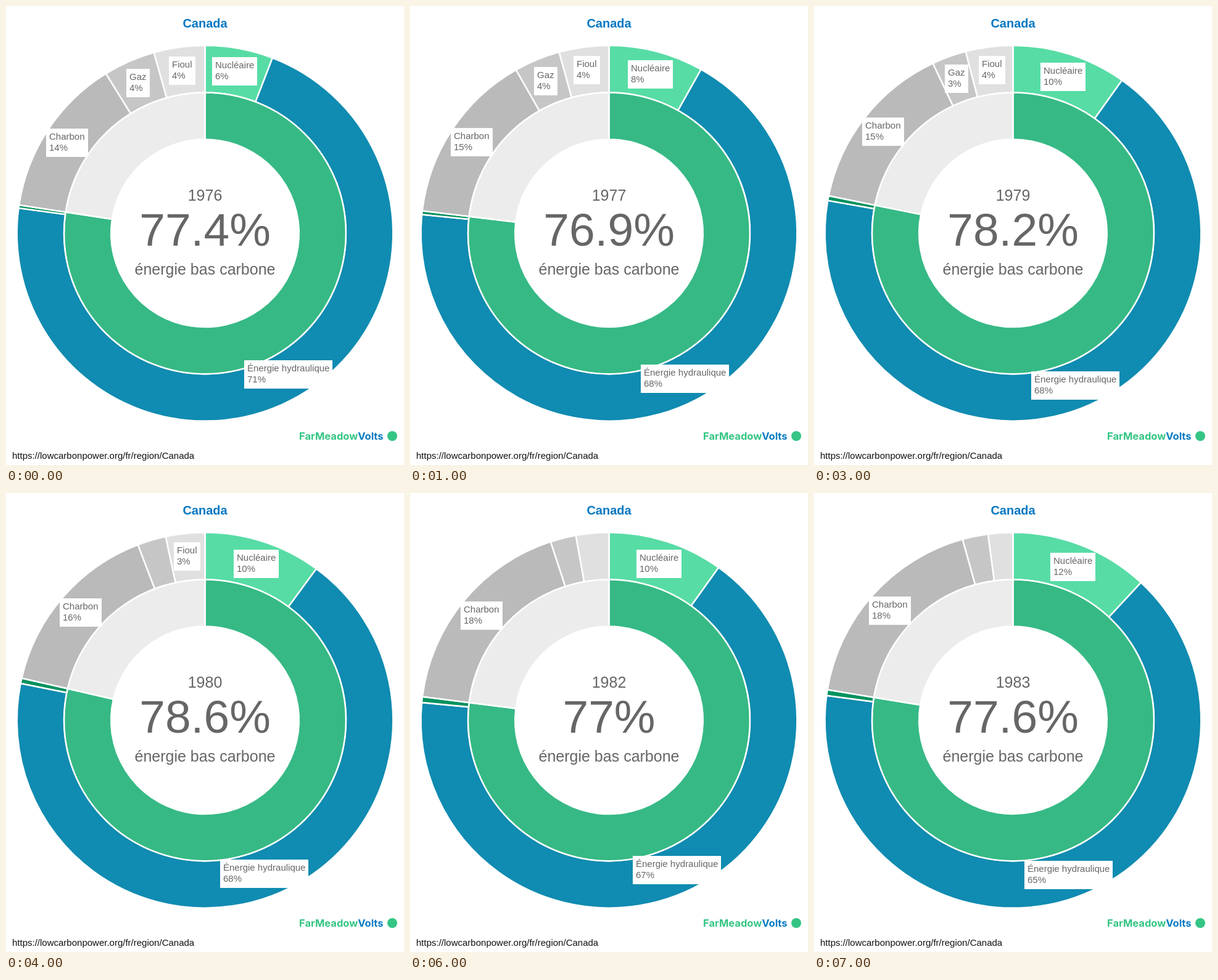
Animation, 645 px wide and 745 px high, one loop 8000 ms. Source, as an HTML page with a canvas:

```html
<!DOCTYPE html>
<html lang="fr">
<head>
<meta charset="utf-8">
<title>Canada</title>
<style>
  html, body { margin: 0; width: 100%; height: 100%; overflow: hidden; background: #fff; }
  canvas { display: block; }
</style>
</head>
<body>
<canvas id="chart" width="645" height="745"></canvas>
<script>
const ctx = document.getElementById('chart').getContext('2d');
const CX = 322.5, CY = 368.8;
const RADII = { hole: 152.3, middle: 228.4, outer: 304.8, label: 266.8 };
const YEAR_MS = 1000, YEAR_COUNT = 8, FIRST_YEAR = 1976, MIN_LABEL = 2.9;
const SANS = '"Liberation Sans", Arial, sans-serif';

// Shares in percent at a few key years; the years between are interpolated.
const KEY_YEARS = [0, 1, 3, 5, 6, 7];
const LOW_CARBON = [77.4, 76.9, 78.2, 78.9, 77, 77.6];
const NUCLEAR = [5.84, 8.14, 9.84, 10.32, 9.9, 11.91];
const OIL = [4.38, 4.27, 4.05, 2.66, 2.82, 2.12];

function shareAt(year, shares) {
  const i = Math.max(1, KEY_YEARS.findIndex(key => key >= year));
  const t = (year - KEY_YEARS[i - 1]) / (KEY_YEARS[i] - KEY_YEARS[i - 1]);
  return shares[i - 1] + (shares[i] - shares[i - 1]) * t;
}

function energyMix(year) {
  const lowCarbon = Math.round(shareAt(year, LOW_CARBON) * 10) / 10;
  const nuclear = shareAt(year, NUCLEAR);
  const oil = shareAt(year, OIL);
  const gas = Math.max(2.2, 4.45 - 0.5 * year);
  const others = Math.min(0.5, 0.26 + 0.05 * year);
  const sources = [
    ['Nucléaire', '#57dca5', nuclear],
    ['Énergie hydraulique', '#108bb1', lowCarbon - nuclear - others],
    ['', '#05925f', others],
    ['Charbon', '#bababa', 100 - lowCarbon - gas - oil],
    ['Gaz', '#c6c6c6', gas],
    ['Fioul', '#e0e0e0', oil],
  ];
  let from = 0;
  const slices = sources.map(([name, color, share]) =>
    ({ name, color, share, from, to: from += share }));
  return { lowCarbon, slices };
}

const angle = percent => (percent / 50 - 0.5) * Math.PI;

function drawSlice(inner, outer, from, to, color) {
  ctx.beginPath();
  ctx.arc(CX, CY, outer, angle(from), angle(to));
  ctx.arc(CX, CY, inner, angle(to), angle(from), true);
  ctx.closePath();
  ctx.fillStyle = color;
  ctx.fill();
  ctx.stroke();
}

function text(string, x, y, size, color, align = 'left', weight = '', family = SANS) {
  ctx.font = `${weight} ${size}px ${family}`;
  ctx.fillStyle = color;
  ctx.textAlign = align;
  ctx.fillText(string, x, y);
  return ctx.measureText(string).width;
}

function drawLabel({ name, share, from, to }) {
  const mid = angle((from + to) / 2);
  ctx.font = `15px ${SANS}`;
  const width = Math.round(ctx.measureText(name).width + 10), height = 46;
  const x = Math.floor(CX + RADII.label * Math.cos(mid) - width / 2);
  const y = Math.round(CY + RADII.label * Math.sin(mid) - height / 2);
  ctx.fillStyle = '#fff';
  ctx.fillRect(x, y, width, height);
  text(name, x + 5, y + 18, 15, '#666');
  text(Math.round(share) + '%', x + 5, y + 36, 15, '#666');
}

function drawBrand() {
  const family = 'Inter, "Open Sans", sans-serif';
  const width = text('FarMeadow', 475, 704, 16.5, '#34c584', 'left', 'bold', family);
  text('Volts', 475 + width, 704, 16.5, '#0a7cc2', 'left', 'bold', family);
  ctx.beginPath();
  ctx.arc(626, 698, 8, 0, 2 * Math.PI);
  ctx.fillStyle = '#34c584';
  ctx.fill();
}

function draw(year) {
  const { lowCarbon, slices } = energyMix(year);
  ctx.fillStyle = '#fff';
  ctx.fillRect(0, 0, 645, 745);
  ctx.strokeStyle = '#fff';
  ctx.lineWidth = 2.5;
  for (const { from, to, color } of slices) drawSlice(RADII.middle, RADII.outer, from, to, color);
  drawSlice(RADII.hole, RADII.middle, 0, lowCarbon, '#36b985');
  drawSlice(RADII.hole, RADII.middle, lowCarbon, 100, '#ececec');
  slices.filter(({ name, share }) => name && share >= MIN_LABEL).forEach(drawLabel);

  text('Canada', CX, 35, 20, '#0077c2', 'center', 'bold');
  text(FIRST_YEAR + year, CX, 316, 25, '#666', 'center');
  text(lowCarbon + '%', CX, 389, 75, '#666', 'center');
  text('énergie bas carbone', CX, 436, 25, '#666', 'center');
  text('https://lowcarbonpower.org/fr/region/Canada', 10, 735, 15, '#111');
  drawBrand();
}

function tick(now) {
  draw(Math.floor(now / YEAR_MS) % YEAR_COUNT);
  requestAnimationFrame(tick);
}
requestAnimationFrame(tick);
</script>
</body>
</html>
```
